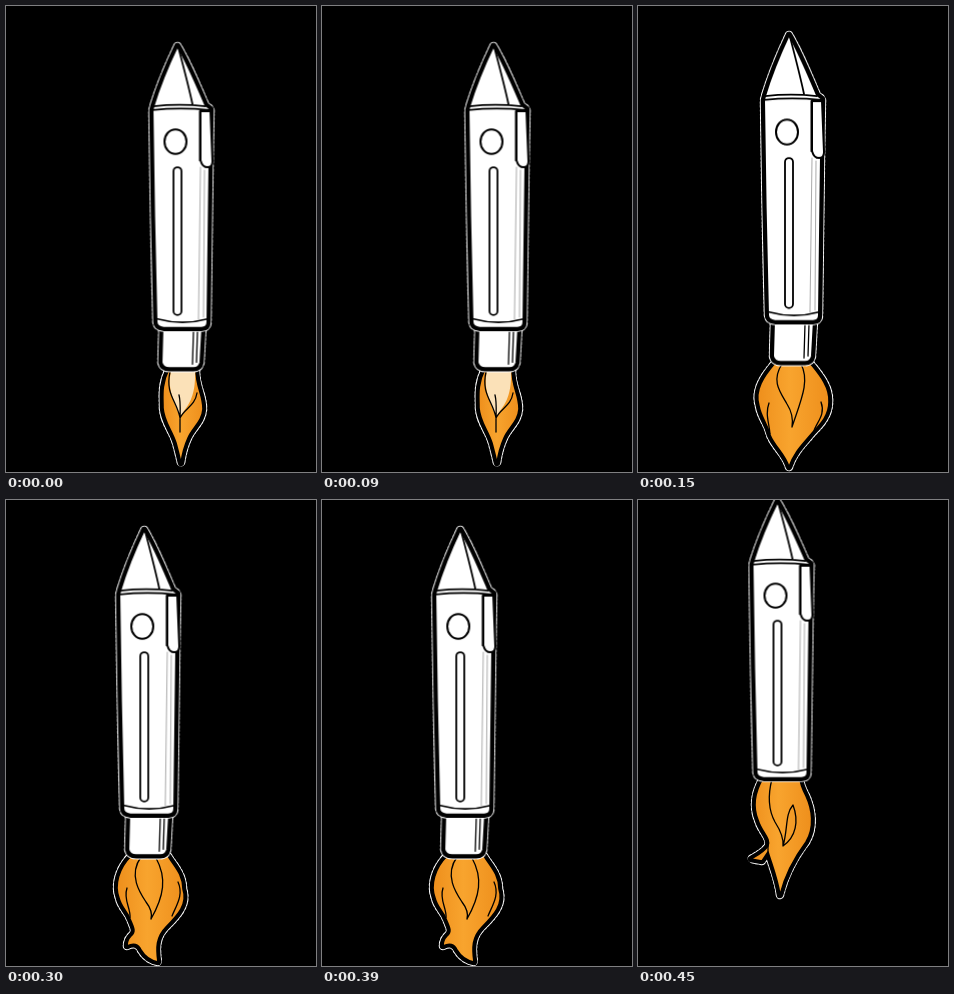
Animation, 310 px wide and 466 px high, one loop 600 ms. Source, as an HTML page:

```html
<!DOCTYPE html>
<html lang="en">
<head>
<meta charset="utf-8">
<title>Rocket pen</title>
<style>
  html, body { margin: 0; width: 100%; height: 100%; overflow: hidden; background: #000; }
  svg { display: block; width: 100vw; height: 100vh; }
  path, ellipse, rect { stroke-linecap: round; stroke-linejoin: round; }

  .rim { fill: none; stroke: #fff; stroke-width: 8.6; stroke-dasharray: 1 2 2 3 1 3; }
  .rim, .rim path { stroke-linecap: butt; }
  .gap { fill: none; stroke: #000; stroke-width: 6.6; }
  .skin { fill: #fff; stroke: #000; stroke-width: 2; }
  .fire { fill: url(#glow); stroke: #000; stroke-width: 1.6; }
  .ink { fill: none; stroke: #000; stroke-width: 1.8; }
  .fine { fill: none; stroke: #000; stroke-width: 1.3; }
  .shade { fill: none; stroke: #aaa; stroke-width: 1; }

  .rocket { animation: fly .6s step-end infinite; }
  .nozzle { animation: nozzle .6s step-end infinite; }
  .flame { opacity: 0; animation: flicker .6s step-end infinite; }
  .second { animation-delay: -.45s; }
  .third { animation-delay: -.3s; }
  .fourth { animation-delay: -.15s; }

  @keyframes fly {
    0%   { transform: matrix(1, 0, 0, .985, 20.5, 11.5); }
    25%  { transform: none; }
    50%  { transform: matrix(1, 0, 0, .995, -12.7, 1); }
    75%, 100% { transform: matrix(1, 0, 0, .965, -11.5, -26); }
  }
  @keyframes nozzle { 0% { opacity: 1; } 75%, 100% { opacity: 0; } }
  @keyframes flicker { 0% { opacity: 1; } 25%, 100% { opacity: 0; } }
</style>
</head>
<body>
<svg viewBox="0 0 310 466">
  <defs>
    <linearGradient id="glow">
      <stop offset="0" stop-color="#ee8f1c"/>
      <stop offset=".45" stop-color="#f8a42e"/>
      <stop offset="1" stop-color="#ee8f1c"/>
    </linearGradient>
    <path id="hull" d="M151 29 C142 48 133 70 127 90 L126 94 C127 165 128 238 130 309 Q130 314 137 315 H175 Q181 315 181 309 L183 150 L184 93 L179 89 C170 68 161 46 151 29Z"/>
    <path id="tube" d="M136 314 L135 350 Q136 356 143 356 H167 Q173 356 174 350 L176 314Z"/>
    <path id="fireA" d="M163 363 C155 379 157 390 157 402 C158 416 166 424 170 437 Q173 448 175 457 Q177 443 182 432 C187 421 196 416 197 403 C197 388 190 382 190 363Z"/>
    <path id="fireB" d="M137 357 C126 370 116 384 121 400 C123 412 129 416 132 429 C137 441 147 448 151 461 C156 446 165 438 175 426 C183 418 191 409 191 396 C192 380 180 367 172 357Z"/>
    <path id="fireC" d="M125 356 C113 368 108 385 113 398 C115 407 121 411 124 419 C128 428 130 432 125 436 Q121 440 121 446 Q131 441 135 450 Q141 460 152 462 C150 448 150 437 160 427 C172 415 182 404 177 389 C177 374 168 366 162 356Z"/>
    <path id="fireD" d="M125 278 C118 290 114 305 120 320 C124 333 133 338 130 346 C126 352 120 355 113 359 L124 361 L130 352 C134 365 140 380 142 395 C147 375 156 358 168 342 C177 327 174 309 168 296 C164 288 162 283 162 278Z"/>
  </defs>

  <g class="flame">
    <use href="#fireA" class="rim"/><use href="#fireA" class="gap"/><use href="#fireA" class="fire"/>
    <path fill="#fbe1b8" d="M165 365 C161 383 168 395 174 411 C181 400 190 393 189 365Z"/>
    <path class="fine" d="M164 366 C159 388 171 395 174 412 V426 M173 389 C175 397 174 405 174 416 M191 387 C189 400 179 402 174 412"/>
  </g>
  <g class="flame second">
    <use href="#fireB" class="rim"/><use href="#fireB" class="gap"/><use href="#fireB" class="fire"/>
    <path class="fine" d="M144 358 C133 375 142 386 149 398 Q156 409 154 421 M163 358 C172 375 163 394 154 421 M131 397 C127 408 131 416 132 428 M183 396 C188 409 178 417 176 425"/>
  </g>
  <g class="flame third">
    <use href="#fireC" class="rim"/><use href="#fireC" class="gap"/><use href="#fireC" class="fire"/>
    <path class="fine" d="M135 357 C122 375 134 393 140 402 Q147 411 145 419 M150 358 C161 378 158 396 145 419 M121 388 C117 400 125 408 124 418 M172 382 C178 395 170 406 166 416"/>
  </g>
  <g class="flame fourth">
    <use href="#fireD" class="rim"/><use href="#fireD" class="gap"/><use href="#fireD" class="fire"/>
    <path class="fine" d="M134 279 C129 298 131 311 137 322 Q146 336 145 346 M145 346 C158 337 161 321 155 305 C147 314 150 329 145 346 M130 345 L130 352"/>
  </g>

  <g class="rocket">
    <g class="nozzle">
      <use href="#tube" class="rim"/><use href="#tube" class="gap"/><use href="#tube" class="skin"/>
      <path class="fine" d="M167 318 L166 352 M171 318 L170 350"/>
    </g>
    <use href="#hull" class="rim"/><use href="#hull" class="gap"/><use href="#hull" class="skin"/>
    <path class="ink" d="M152 31 C157 50 162 69 166 88 M127 90 Q153 87 179 90 M126 94 Q154 91 183 94"/>
    <path class="ink" d="M131 306 Q156 313 181 306"/>
    <path class="shade" d="M174 152 L172 306 M178 155 L177 304"/>
    <path class="skin" d="M174 95 V145 Q176 152 181 152 Q186 152 186 146 L184 95Z"/>
    <path class="ink" d="M173.4 95 V145"/>
    <ellipse class="skin" cx="149" cy="126" rx="11" ry="12.5"/>
    <rect class="skin" style="stroke-width:1.8" x="147" y="152" width="8" height="150" rx="4"/>
  </g>
</svg>
</body>
</html>
```
